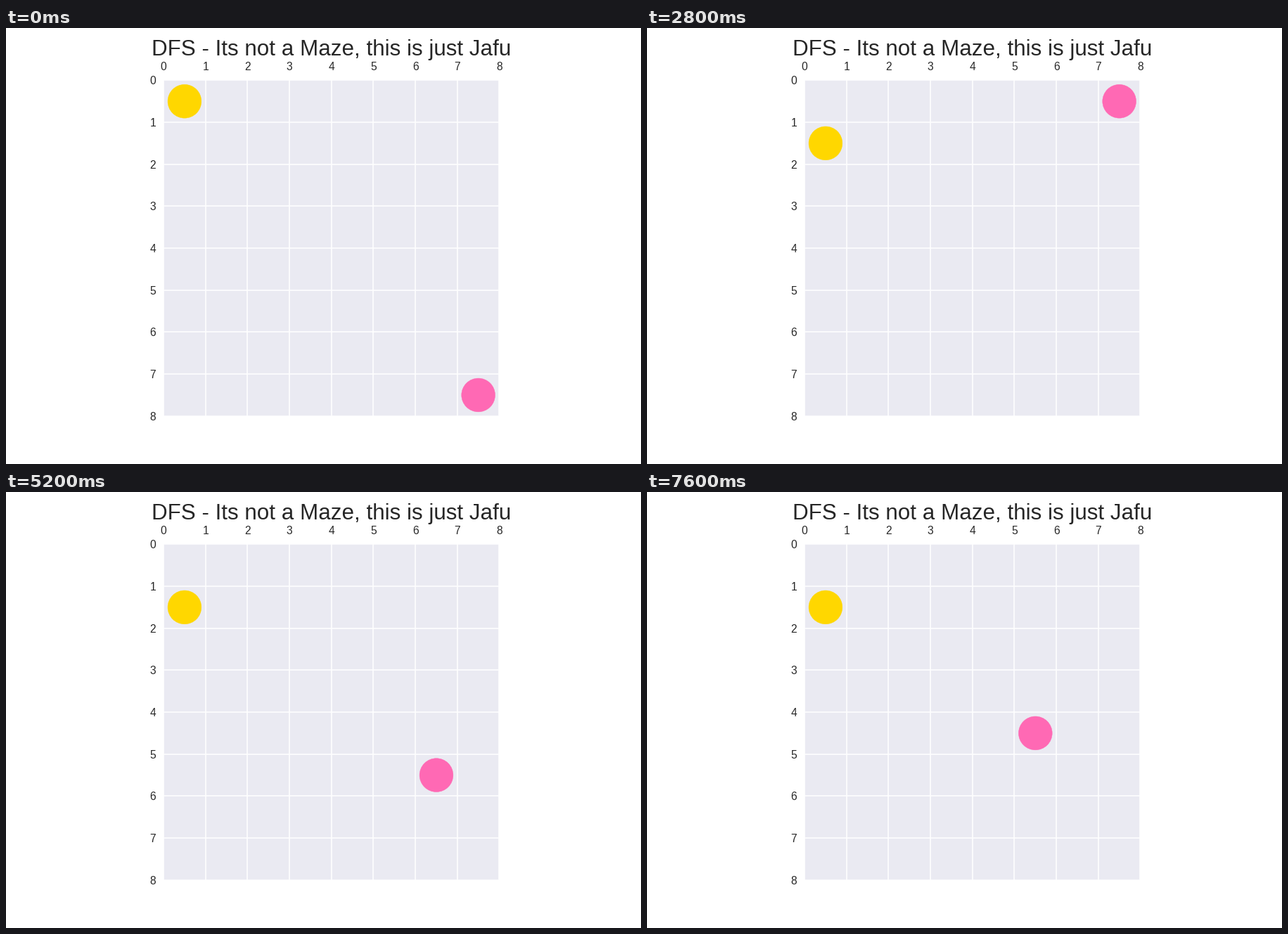
Animation of 903 by 620 pixels, one loop 8 s. Source, as a matplotlib script:

```python
import matplotlib.pyplot as plt
from matplotlib.animation import FuncAnimation
from matplotlib.patches import Circle

WIDTH, HEIGHT, DPI = 903, 620, 128
PT = 112.8 / DPI  # point sizes are designed for an 8 x 5.5 inch sheet
CELLS = 8
STEPS = 20
INK = "#262626"

plt.rcParams["font.family"] = "Liberation Sans"

fig = plt.figure(figsize=(WIDTH / DPI, HEIGHT / DPI), dpi=DPI, facecolor="white")
ax = fig.add_axes([0.125, 0.11, 0.775, 0.77], facecolor="#EAEAF2")
ax.set_aspect("equal")
ax.set_xlim(0, CELLS)
ax.set_ylim(CELLS, 0)
ax.set_xticks(range(CELLS + 1))
ax.set_yticks(range(CELLS + 1))
ax.set_axisbelow(True)
ax.grid(color="white", linewidth=PT, linestyle="-")
ax.xaxis.tick_top()
ax.tick_params(length=0, pad=7 * PT, labelsize=10 * PT, labelcolor=INK)
ax.spines[:].set_visible(False)
ax.set_title("DFS - Its not a Maze, this is just Jafu",
             fontsize=20 * PT, pad=6 * PT, color=INK)


def add_disc(color):
    return ax.add_patch(Circle((0.5, 0.5), 0.4, color=color, linewidth=0.3 * PT))


seeker = add_disc("hotpink")
runner = add_disc("gold")


def place(disc, col, row):
    disc.center = (col + 0.5, row + 0.5)


def update(step):
    # The seeker sweeps columns right to left, alternating up and down.
    sweep, offset = divmod(step, CELLS)
    row = offset if sweep % 2 else CELLS - 1 - offset
    place(seeker, CELLS - 1 - sweep, row)
    place(runner, 0, step % 2)
    return seeker, runner


anim = FuncAnimation(fig, update, frames=STEPS, interval=400,
                     repeat=True, repeat_delay=0)
plt.show()
```
